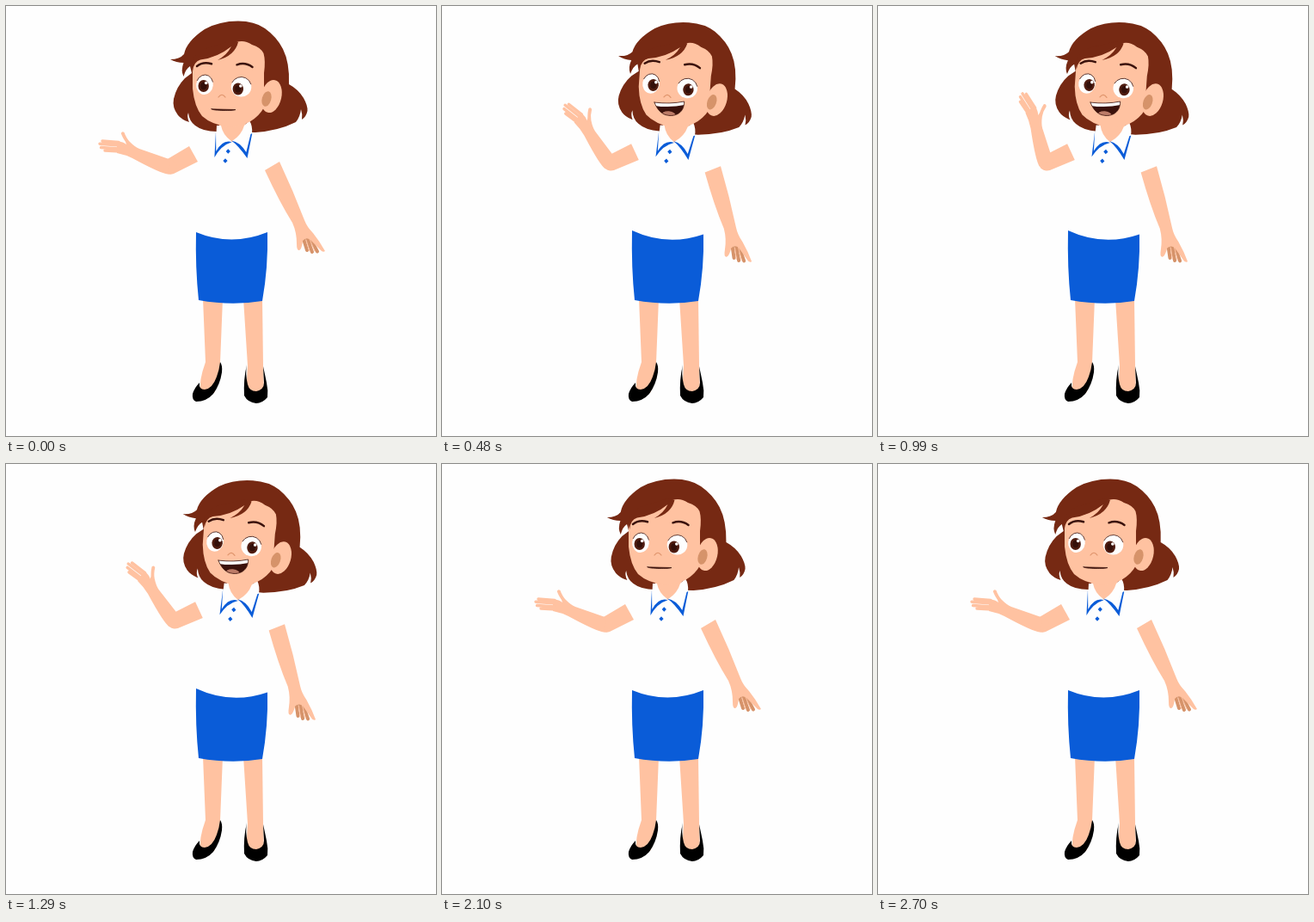
An HTML page with a canvas that plays this animation: 500 px wide and 500 px high, repeating every 2730 ms.

```html
<!DOCTYPE html>
<html>
<head>
<meta charset="utf-8">
<style>
  html, body { margin: 0; height: 100%; overflow: hidden; background: #fefefe; }
  canvas { display: block; }
</style>
</head>
<body>
<canvas id="stage" width="500" height="500"></canvas>
<script>
const ctx = document.getElementById('stage').getContext('2d');
const LOOP = 2730, STEP = 30;
const SKIN = '#ffc2a1', SHADE = '#d6936a', HAIR = '#762913', BLUE = '#0a5cd8',
      WHITE = '#fefefe', DARK = '#3b120c';

const smooth = x => { x = Math.min(1, Math.max(0, x)); return x * x * (3 - 2 * x); };
const mix = (a, b, k) => a + (b - a) * k;
// 0 = resting pose, 1 = greeting pose
const pose = (t, start, length, back = 1500) =>
  smooth((t - start) / length) * (1 - smooth((t - back) / 360));

function fill(color, d) {
  ctx.fillStyle = color;
  ctx.fill(new Path2D(d));
}
function line(color, width, d) {
  ctx.strokeStyle = color;
  ctx.lineWidth = width;
  ctx.stroke(new Path2D(d));
}
function oval(color, x, y, rx, ry = rx, angle = 0) {
  ctx.fillStyle = color;
  ctx.beginPath();
  ctx.ellipse(x, y, rx, ry, angle, 0, 7);
  ctx.fill();
}
function turned(x, y, degrees, draw) {
  ctx.save();
  ctx.translate(x, y);
  ctx.rotate(degrees * Math.PI / 180);
  ctx.translate(-x, -y);
  draw();
  ctx.restore();
}

function legs(p) {
  fill(SKIN, 'M229 340L232 414Q224 436 226 450L242 450Q249 436 249 415L252 340Z');
  fill(SKIN, 'M276 340L281 418L279 450L300 450L299 418L298 340Z');
  fill('#000', 'M249 414Q252 418 251 426Q249 440 241 451Q233 460 221 460Q216 458 217 451Q219 444 225 438Q224 446 231 446Q240 445 245 431Q248 423 249 414Z');
  fill('#000', 'M280 417Q278 427 281 440Q283 448 291 448Q300 446 300 438L299 419Q301 428 303 438Q305 447 304 455Q298 462 291 462Q281 461 277 453Q276 434 280 417Z');
  const left = 263 - 2 * p, right = 263 + 2.5 * p;
  fill(BLUE, `M221 ${left}Q262 280 304 ${right}Q305 304 298 343Q262 349 224 342Q220 304 221 ${left}Z`);
}

function wavingArm(angle) {
  fill(SKIN, 'M213 163L223 181L195 195Q189 197 184 193L186 179Z');
  oval(SKIN, 190, 187, 8.5);
  turned(190, 187, angle, () => {
    fill(SKIN, 'M189 195.5Q182 196 147 177Q139 173 129 171L129 157Q137 158 140 161L139 158Q135 152 133.8 148Q135 145 137.5 147Q140 154 144 158Q150 164 155 166L191 178.5Z');
    line(SKIN, 3.4, 'M131 158.5L112 157M131 162L109 160.2M131 166L110.5 164.5M133 169L115 168');
  });
}

function loweredArm(angle) {
  turned(310, 187, angle, () => {
    line(SHADE, 4, 'M346 271L350 284M350 270L356 286M353 269L362 285.5');
    fill(SKIN, 'M301 191L318 181Q334 215 347 249Q350 257 357 264Q365 274 371 285Q368 287 365 283L354 272Q349 268 345 273Q344 283 341 284Q338 285 338 276Q338 263 333 252Q318 228 301 191Z');
    line(SKIN, 1, 'M349 272L353 285M353 271L359 285');
  });
}

function collar() {
  fill(SKIN, 'M247 134L250 147Q256 156 263 158Q272 152 277 144L280 132Z');
  fill(WHITE, 'M245 139L250 139Q252 150 262 157L243 175Z');
  fill(WHITE, 'M283 133Q287 140 286 148L280 176L263 157Q274 150 277 139Z');
  fill(BLUE, 'M244 146L242.4 176Q250 162 262.5 158.2Q252 155 244.3 169Z');
  fill(BLUE, 'M262 156.5Q270 162 280.5 177L286.3 148L284.5 149L279.3 170Q272 158 262 156.5Z');
  for (const [x, y] of [[258.3, 169], [255, 180]])
    fill(BLUE, `M${x} ${y - 2.8}l2.6 2.8l-2.6 2.8l-2.6 -2.8Z`);
}

function swayed(sway, draw) {
  const k = sway / 115;
  ctx.save();
  ctx.transform(1, 0, k, 1, -20 * k, 0);
  draw();
  ctx.restore();
}

function backHair() {
  fill(HAIR, 'M191 62Q202 62 207 56Q210 41 231 27Q248 17.5 270 17.5Q289 17.5 301 26Q315 36 322 50Q330 66 329 91Q340 97 346 107Q351 116 350.5 122Q349 129 344 132Q345 126 343 120Q342 129 337 135Q317 145 290 147L245 146Q229 146 220 139Q213 134 212 124Q210 129 213 135Q204 132 200 127Q193 118 195 108Q198 94 208 84L216 78L214 70Q209 73 206.5 82Q203 75 206.5 66Q198 66 191 62Z');
}

function eye(x, y, rx, ry, px, py) {
  oval(WHITE, x, y, rx, ry, .1);
  ctx.strokeStyle = DARK;
  ctx.lineWidth = .8;
  ctx.beginPath();
  ctx.ellipse(x, y, rx, ry, .1, 3.5, 5.9);
  ctx.stroke();
  oval('#4f1c10', px, py, 6.2, 7);
  oval('#34100a', px, py, 3.5, 4.2);
  oval('#fff', px + 3, py - 3.5, 1.8);
}

function mouth(open) {
  const at = (a, b) => mix(a, b, open);
  const shape = `M${at(239, 236.5)} ${at(119.8, 113)}Q${at(253, 255)} ${at(120.2, 114)} ${at(267, 271)} ${at(120.5, 109.5)}` +
    `C${at(266, 272)} ${at(121.5, 123)} ${at(259, 262)} ${at(121.5, 127.5)} ${at(253, 254)} ${at(121.5, 127)}` +
    `C${at(247, 246)} ${at(121.5, 127)} ${at(240, 240)} ${at(121, 121)} ${at(239, 236.5)} ${at(119.8, 113)}Z`;
  ctx.save();
  ctx.clip(new Path2D(shape));
  ctx.fillStyle = DARK;
  ctx.fillRect(230, 100, 50, 40);
  if (open > .3) {
    oval('#bd7c68', 254, 128, 9, 6);
    line(WHITE, 9 * open, `M234 112Q255 ${at(120, 114.5)} 274 108`);
  }
  ctx.restore();
  line(DARK, .7, shape);
}

function head(p, sway) {
  fill(SKIN, 'M217 76Q216 67 222 62Q244 60 260 48L268 42Q277 39 286 45Q296 48 299.5 55Q302 64 300 78L300 118Q288 139 260 141Q239 138 228 128Q219 117 217 96Z');
  oval(SKIN, 308.5, 105, 11.8, 19.3, .22);
  oval(SHADE, 303, 108, 5.3, 9, .28);
  swayed(sway, () => fill(HAIR, 'M217 76Q212 60 230 50L262 40L270 42Q266 58 246 63Q257 57 262 47Q246 60 226 62.5Q218 65 217 76Z'));
  eye(231, 91.5, 9.8, 11.5, 229.7 + 4 * p, 93);
  eye(273.5, 94, 11.8, 11.5, 269.8 + 5 * p, 96.5 - p);
  const lift = -1.5 * p;
  line(DARK, 2.5, `M222 ${70 + lift}Q229 ${64.5 + lift} 239 ${67.3 + lift}M268.5 ${68.3 + lift}Q278 ${64.8 + lift} 286.5 ${71 + lift}`);
  line('#df946c', 1.2, 'M247 106Q251 100.5 255 106');
  mouth(smooth((p - .2) / .6));
}

function draw(t) {
  const body = pose(t, 0, 360);
  const arm = pose(t, 20, 390);
  const low = pose(t, 100, 400, 1590);
  const wave = 39 - 21 * Math.cos(2 * Math.PI * (t - 587) / 600);
  const sway = 2.5 * Math.sin(2 * Math.PI * t / (LOOP / 3)) + 10 * (pose(t - 60, 0, 360) - body);
  ctx.fillStyle = WHITE;
  ctx.fillRect(0, 0, 500, 500);
  ctx.lineCap = ctx.lineJoin = 'round';
  legs(body);
  turned(255, 263, 4 * body, () => {
    wavingArm(arm * wave);
    loweredArm(5 * low);
    swayed(sway, backHair);
    collar();
    head(body, sway);
  });
}

function tick() {
  draw(Math.floor(performance.now() % LOOP / STEP) * STEP);
  requestAnimationFrame(tick);
}
tick();
</script>
</body>
</html>
```
